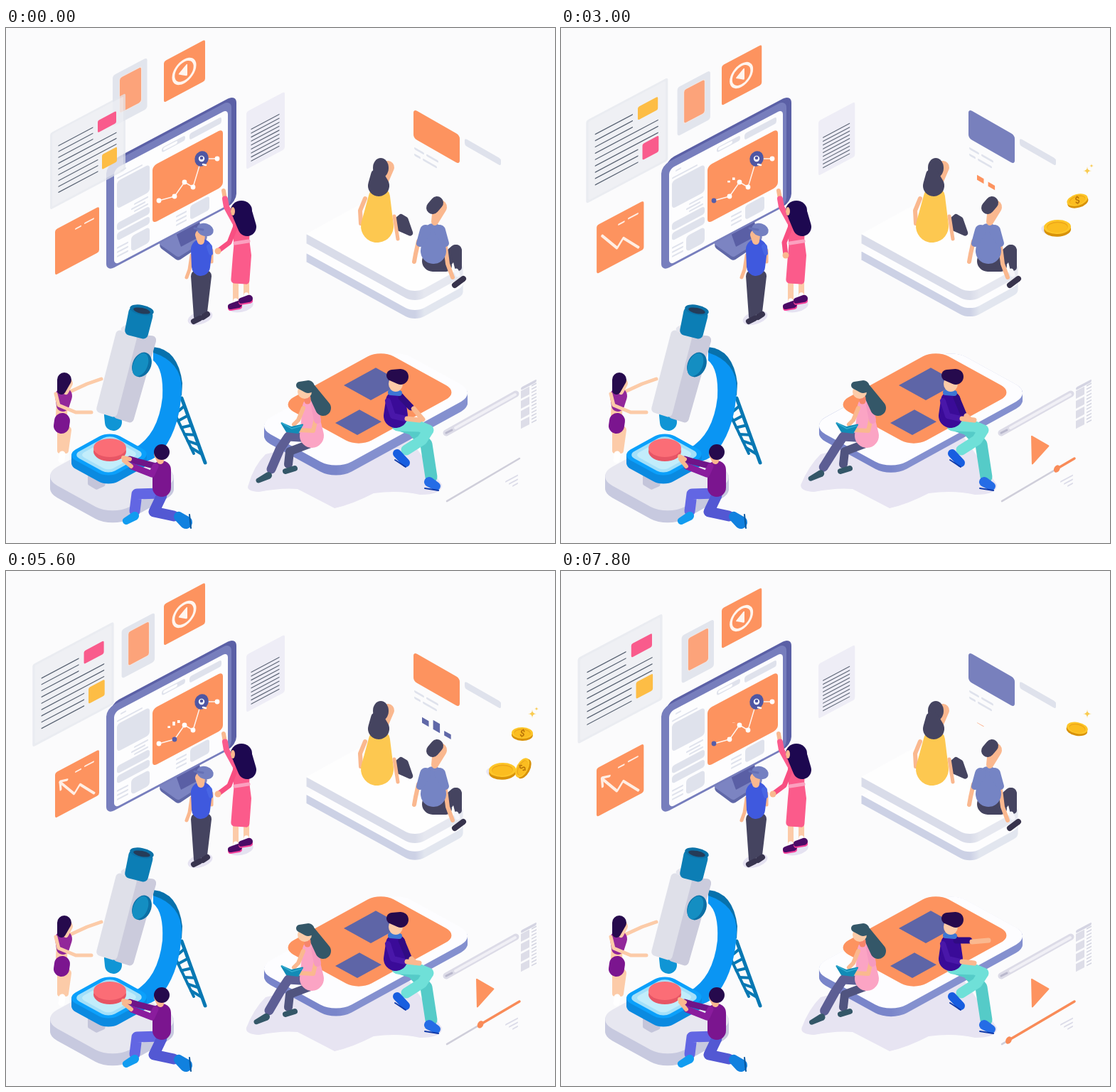
These frames come from a looping animation (772 px wide and 725 px high, 8000 ms). An HTML page with a canvas:

```html
<!DOCTYPE html>
<html lang="en">
<head>
<meta charset="utf-8">
<title>Isometric scenes</title>
<style>
html, body { margin: 0; width: 100%; height: 100%; overflow: hidden; background: #fbfbfc; }
canvas { display: block; }
</style>
</head>
<body>
<canvas id="stage" width="772" height="725"></canvas>
<script>
const ctx = document.getElementById('stage').getContext('2d');
const LOOP = 8000, STEP = 200;
const ORANGE = '#fd935f', PURPLE = '#6068a8', INK = '#454460', SKIN = '#fab88f', PALE = '#fccba8';
const PINK = '#f95b8c', YELLOW = '#fdbd45', GREY = '#dfe2ec', NIGHT = '#260a4d', WHITE = '#fff';
const TEAL = '#345768', NAVY = '#3a0b98', PLUM = '#7b158f', BLUE = '#0a95f3', DEEP = '#0c7eb5';

const clamp = v => Math.max(0, Math.min(1, v));
const mix = (a, b, k) => a + (b - a) * k;
const ease = (t, from, to) => { const k = clamp((t - from) / (to - from)); return k * k * (3 - 2 * k); };

function poly(color, r, ...xy) {
  const n = xy.length / 2, at = i => [xy[(i % n) * 2], xy[(i % n) * 2 + 1]];
  ctx.beginPath();
  ctx.moveTo((xy[0] + at(n - 1)[0]) / 2, (xy[1] + at(n - 1)[1]) / 2);
  for (let i = 0; i < n; i++) ctx.arcTo(...at(i), ...at(i + 1), r);
  ctx.fillStyle = color;
  ctx.fill();
}

function line(color, w, ...xy) {
  ctx.beginPath();
  for (let i = 0; i < xy.length; i += 2) ctx.lineTo(xy[i], xy[i + 1]);
  ctx.strokeStyle = color;
  ctx.lineWidth = w;
  ctx.lineCap = ctx.lineJoin = 'round';
  ctx.stroke();
}

function oval(color, x, y, rx, ry = rx, rot = 0) {
  ctx.beginPath();
  ctx.ellipse(x, y, rx, ry, rot, 0, 7);
  ctx.fillStyle = color;
  ctx.fill();
}

// Hull of two circles: the building block of every figure
function limb(color, x0, y0, r0, x1, y1, r1 = r0) {
  const a = Math.atan2(y1 - y0, x1 - x0);
  const f = Math.acos((r0 - r1) / Math.hypot(x1 - x0, y1 - y0));
  ctx.beginPath();
  ctx.arc(x0, y0, r0, a + f, a - f + 2 * Math.PI);
  ctx.arc(x1, y1, r1, a - f, a + f);
  ctx.fillStyle = color;
  ctx.fill();
}

function shape(color, d) {
  ctx.fillStyle = color;
  ctx.fill(new Path2D(d));
}

function box(color, x, y, w, h, r = 0) {
  ctx.beginPath();
  ctx.roundRect(x, y, w, h, r);
  ctx.fillStyle = color;
  ctx.fill();
}

function within(matrix, draw) {
  ctx.save();
  ctx.transform(...matrix);
  draw();
  ctx.restore();
}

// Upright plane with sloping rows, and ground plane hung from its left corner
const plane = (x, y, s, draw, slope = -0.53) => within([s, s * slope, 0, s, x, y], draw);
const ground = (x, y, draw) => within([1, -0.55, 1, 0.55, x, y], draw);
const tile = (color, x, y, w, h, r = 0) => ground(x, y, () => box(color, 0, 0, w, h, r));

function slab(x, y, w, h, r, depth, top, dark, light) {
  const side = ctx.createLinearGradient(0, 0, (w + h) / 2, (w + h) / 2);
  side.addColorStop(h / (w + h), dark);
  side.addColorStop(Math.min(1, h / (w + h) + 0.06), light);
  for (let d = depth; d > 0; d--) tile(side, x, y + d, w, h, r);
  tile(top, x, y, w, h, r);
}

function shade(alpha, draw) {
  ctx.save();
  ctx.globalAlpha = alpha;
  draw();
  ctx.restore();
}

function article(k, a) {
  const top = a < 2900 ? PINK : YELLOW, low = a > 2900 && a < 4500 ? PINK : YELLOW;
  plane(mix(62, 15, k), mix(148, 117, k), mix(1, 1.15, k), () => {
    shade(0.72, () => box('#e3e6ee', 0, 0, 106, 108, 3));
    shade(0.35, () => box('#f6f7fa', 3, 3, 100, 102, 2));
    for (let i = 0; i < 9; i++) {
      const w = i < 3 ? 48 : i < 6 ? 81 : 55;
      line('#586272', 1.3, 12, 24 + i * 8.2, 12 + w, 24 + i * 8.2);
    }
    box(top, 67, 18, 26, 17, 2);
    box(low, 73, 69, 21, 21, 2);
  });
}

function picture(k) {
  plane(mix(150, 174, k), mix(67, 97, k), mix(1, 0.92, k), () => {
    box('#e2e5ed', 0, 0, 48.5, 72, 4);
    box('#f3e6e2', 9, 8, 32, 51, 3);
    box('#fca37a', 10, 9, 30, 49, 3);
  });
}

function playCard(k) {
  plane(mix(222, 226, k), mix(47, 53, k), mix(1, 0.97, k), () => {
    box(ORANGE, 0, 0, 58, 58, 3);
    oval('#fff5ee', 28.5, 29, 17);
    oval(ORANGE, 28.5, 29, 13.2);
    poly('#fff5ee', 1, 20, 29, 33, 20, 33, 38);
  });
}

function memo(k) {
  plane(mix(338, 362, k), mix(118, 131, k), mix(1, 0.95, k), () => {
    box('#eeedf6', 0, 0, 54, 81, 3);
    for (let i = 0; i < 9; i++) line('#5c6475', 1.3, 7, 28 + i * 5.6, 46, 28 + i * 5.6);
  });
}

function arrowCard(k, t) {
  const c = t % 2100, drawn = Math.sqrt(clamp(c / 1000));
  plane(mix(69, 50, k), mix(284, 278, k), mix(1, 1.07, k), () => {
    box(ORANGE, 0, 0, 62, 64, 3);
    line('#ffeee4', 2, 29, 14, 36, 14);
    line('#ffeee4', 2, 42, 13, 54, 13);
    if (!drawn) return;
    shade(1 - ease(c, 1600, 2050), () => {
      ctx.setLineDash([80 * drawn, 200]);
      line('#ffeee4', 3, 55, 58, 35, 35, 27, 44, 7, 17);
      ctx.setLineDash([]);
      if (drawn === 1) line('#ffeee4', 3, 17, 19, 7, 16, 8, 28);
    });
  });
}

// Calls draw(index, share of full height) for each growing bar
function bars(b, draw) {
  shade(1 - ease(b, 2250, 2480), () => {
    for (let i = 0; i < 5; i++) draw(i, clamp((b - 280 - 130 * i) / 250));
  });
}

function chart(b) {
  bars(b, (i, g) => {
    const h = (4 + 2.5 * i + 0.6 * i * i) * g;
    box(WHITE, 241 - 6.8 * i, 214 + 3.5 * i - h, 3.6, h);
  });
  const nodes = [[215, 243], [237, 237], [251, 217], [263, 224], [275, 184], [297, 184]];
  line('#fff3ec', 1.5, ...nodes.flat());
  const active = Math.floor((b - 250) / 340);
  nodes.forEach(([x, y], i) => oval(i === active ? '#565da8' : WHITE, x, y, 3.4));
  oval('#4f57a3', 275, 184, 9.5, 11, 0.4);
  oval(WHITE, 275, 184, 4.2);
  oval('#4f57a3', 275, 183, 2.3);
  line(WHITE, 2.5, 277, 192, 281, 193);
}

function monitor(b) {
  poly(PURPLE, 6, 211, 305, 255, 282, 288, 297, 242, 328);
  poly('#7c84c2', 5, 211, 301, 255, 278, 288, 294, 242, 323);
  poly('#5a5fa5', 1, 236, 280, 270, 262, 276, 292, 246, 308);
  plane(147, 187, 1, () => box('#5b60a6', 0, 0, 177, 152, 12));
  plane(141, 194, 1, () => box('#777ebd', 0, 0, 176, 149, 11));
  plane(152, 199, 1, () => {
    box('#fdfdfe', 0, 0, 160, 135, 7);
    box(GREY, 9, 6, 8, 2, 1);
    box(GREY, 67, 5, 33, 7, 3);
    box('#fdfdfe', 69, 6.5, 20, 4, 2);
    box(GREY, 106, 6, 45, 9, 3);
    box(GREY, 4, 14, 36, 2, 1);
    box(GREY, 4, 19, 46, 39, 5);
    for (let i = 0; i < 3; i++) {
      box(GREY, 28 - i % 2 * 4, 63 + i * 5, 20, 2.2, 1);
      box(GREY, 4, 112 + i * 6, 16, 2.2, 1);
      box(GREY, 87, 112 + i * 6, 15, 2.2, 1);
      if (i) box(GREY, 4, 64 + i * 14, 46, 11, 4);
    }
    box(GREY, 24, 107, 26, 22, 5);
    box(GREY, 107, 108, 27, 20, 4);
    box(ORANGE, 54, 24, 99, 81, 6);
  });
  chart(b);
}

function boy() {
  oval('#e5e2f1', 273, 408, 18, 9, -0.3);
  limb(INK, 268, 349, 8, 269, 406, 5);
  limb(INK, 281, 349, 8, 278, 400, 5);
  limb('#38344f', 264, 413, 4, 272, 409);
  limb('#38344f', 277, 407, 4, 283, 403);
  line(SKIN, 5, 261, 320, 258, 340, 254, 351);
  line(SKIN, 5, 289, 313, 289, 329);
  limb('#3f59de', 275, 312, 15, 274, 336, 13);
  limb('#4866e4', 286, 308, 4, 288, 317, 3);
  limb(SKIN, 273, 291, 7, 274, 300, 5);
  oval('#7480c1', 280, 284, 12, 9, 0.3);
  line('#6570b5', 3, 265, 282, 277, 284);
}

function presenter(t, b) {
  const press = ease(b, 580, 1200) - ease(b, 2200, 2500);
  const reach = 1 - ease(t, 600, 1300) + ease(t, 3600, 5600);
  oval('#e5e2f1', 330, 391, 18, 9, -0.2);
  for (const x of [323, 338]) {
    const y = 389 - (x - 323) * 0.55;
    line(PALE, 8, x, 350, x, y - 6);
    line(WHITE, 7, x, y - 5, x, y);
    limb('#f33f99', x - 7, y + 5, 4, x + 5, y + 3);
    limb('#4b0b66', x - 7, y + 3, 4, x + 4, y, 5);
  }
  const hx = mix(306, 295, press), hy = mix(229, 241, press);
  const ex = mix(310, 307, press), ey = mix(252, 257, press);
  line(SKIN, 6, hx, hy, ex, ey);
  line('#fb5b8d', 8, (hx + ex) / 2, (hy + ey) / 2, ex, ey, 322, 274);
  limb('#fb5b8b', 331, 277, 12, 331, 302, 11);
  poly('#fb5b8b', 5, 321, 299, 342, 297, 345, 320, 342, 361, 316, 359, 319, 320);
  line('#fba0bf', 5, 322, 303, 341, 300);
  const gx = mix(316, 298, reach), gy = mix(320, 314, reach);
  line('#f84f82', 7, 323, 279, 314, 302, gx, gy);
  oval(SKIN, gx, gy, 4.5);
  oval('#1d0850', 331, 257, 15, 14);
  limb('#1d0850', 333, 263, 14, 339, 280, 13);
  oval(SKIN, 319, 258, 3, 6);
}

function coin(x, y, rx = 19, ry = 10, rot = 0, mark = '') {
  within([Math.cos(rot), Math.sin(rot), -Math.sin(rot), Math.cos(rot), x, y], () => {
    oval('#d89209', 0, rx / 5, rx, ry);
    oval('#fdc629', 0, 0, rx, ry);
    oval('#eea819', 0, 0, rx * 0.78, ry * 0.75);
    oval('#fbbd20', 0, 1, rx * 0.74, ry * 0.68);
    ctx.fillStyle = '#b97408';
    ctx.font = 'italic bold 13px Roboto, sans-serif';
    ctx.textAlign = 'center';
    ctx.textBaseline = 'middle';
    ctx.fillText(mark, 0, 1);
  });
}

function star(x, y, r) {
  shape('#f9cb51', `M${x} ${y - r}Q${x} ${y} ${x + r} ${y}Q${x} ${y} ${x} ${y + r}Q${x} ${y} ${x - r} ${y}Q${x} ${y} ${x} ${y - r}Z`);
}

function coins(b) {
  shade(1 - ease(b, 2250, 2480), () => {
    if (b >= 500) oval('#e9e6f2', 692, 285, 17, 8, 0.2);
    for (let i = 0; i < 6; i++) {
      const pile = Math.floor(i / 3), n = i % 3;
      const left = 500 + 990 * pile + 140 * n - b;
      const mark = n === 2 ? `${20 + 20 * pile}%` : '';
      if (left <= 0) coin(698 + 28 * pile, 280 + 18 * pile - n * 5, 19, 10, -0.04, mark);
      else if (left < 235) coin(726, 291 - 0.35 * left, 15, 8, 0.2 - (200 - left) * 0.008, i ? '$' : '');
    }
  });
  if (b > 250 && b < 700) {
    star(740, 201, 6);
    if (b > 400) star(746, 194, 3);
  }
}

function board(late, b) {
  plane(573, 114, 1, () => {
    box(late ? '#7880bd' : ORANGE, 0, 0, 65, 41, 5);
    for (let i = 0; i < 2; i++) {
      box(GREY, 1, 53 + 9 * i, 14 - 5 * i, 3, 1.5);
      box(GREY, 18 - 5 * i, 53 + 9 * i, 17 + 3 * i, 3, 1.5);
    }
    box(GREY, 72, 0, 51, 10, 3);
    bars(b, (i, g) => {
      const h = (8 + 8 * i + i * i) * g;
      box(late ? ORANGE : PURPLE, 12 + 15.6 * i, 93 - h, 9.5, h);
    });
  }, 0.57);
}

function bench(bob) {
  const corners = [0, 0, 13, 13];
  slab(422, 314 + 3 * bob, 75, 153, corners, 12, '#fdfdfe', '#ccd1e5', '#e2e6ef');
  slab(422, 290, 75, 153, corners, 13, '#fefefe', '#d9dce9', '#e6e8f0');
}

function sitters() {
  line(SKIN, 6, 505, 240, 498, 257, 499, 275);
  poly(INK, 4, 547, 268, 555, 261, 565, 267, 575, 296, 550, 285);
  line(SKIN, 5, 546, 265, 551, 297);
  limb('#fdc850', 525, 238, 15, 522, 279, 23);
  limb(SKIN, 537, 196, 9, 531, 220, 5);
  oval(INK, 527, 197, 11, 14);
  limb(INK, 522, 207, 9, 524, 222, 15);

  limb(INK, 600, 328, 15, 619, 335, 8);
  limb(INK, 618, 328, 10, 632, 313, 8);
  limb(INK, 633, 313, 8, 636, 337, 5);
  line('#f5f5fa', 7, 633, 342, 635, 347);
  limb('#37334c', 631, 362, 4, 643, 353);
  line(SKIN, 6, 580, 300, 576, 318, 574, 329);
  line(SKIN, 6, 618, 308, 621, 332, 628, 351);
  limb('#7584c4', 601, 290, 15, 601, 314, 18);
  for (const side of [-1, 1]) limb('#7584c4', 600 + side * 10, 285, 8, 600 + side * 18, 303, 5);
  limb(SKIN, 610, 252, 10, 603, 273, 5);
  limb(INK, 606, 246, 9, 600, 253, 9);
}

function ladder() {
  const left = k => [mix(234, 264, k), mix(536, 599, k)];
  const right = k => [mix(247, 280, k), mix(521, 612, k)];
  line('#0878b3', 4, ...left(0), ...left(1));
  line('#0878b3', 5, ...right(0), ...right(1));
  for (let k = 0.12; k < 1; k += 0.15) line('#0878b3', 4, ...left(k), ...right(k));
}

function microscope() {
  slab(48, 631, 100, 102, 24, 17, '#e7e7f0', '#c7c9df', '#c7c9df');
  ladder();
  shape('#0871ac', 'M207 449 Q242 452 248 500 L247 518 L207 465Z');
  shape(BLUE, 'M207 457 Q247 470 247 508 Q245 560 222 592 Q212 606 198 610 L180 592 Q214 573 220 520 Q222 480 207 468Z');
  poly('#c4c5da', 3, 115, 626, 142, 630, 139, 645, 127, 650, 115, 643);
  slab(84, 601, 62, 60, 14, 12, '#0ba0fb', '#0b8ae0', '#0b8ae0');
  tile('#a4e0f9', 94, 601, 52, 50, 9);
  tile('#c2edfb', 103, 601, 43, 41, 7);
  limb('#e75565', 145, 599, 9, 147, 599);
  oval('#e75565', 146, 596, 23, 14);
  oval('#fb6d76', 146, 591, 23, 13);
  limb('#1095d5', 150, 545, 12, 151, 555, 12);
  poly('#cbcbdc', 6, 180, 431, 213, 434, 178, 557, 150, 548);
  poly('#dfe0e9', 6, 156, 424, 185, 433, 155, 549, 126, 540);
  poly('#e6e6ee', 4, 156, 425, 172, 416, 214, 434, 184, 435);
  poly(DEEP, 7, 174, 391, 208, 400, 198, 439, 166, 431);
  oval('#0c72a8', 191, 397, 17, 7, 0.2);
  oval('#253c59', 191, 398, 12, 4, 0.2);
  oval('#0b6fa5', 191, 474, 13, 18, 0.4);
  oval('#148ec2', 189, 474, 10, 17, 0.4);
}

function labWoman() {
  for (const x of [78, 86]) limb(PALE, x, 566, 6, x - 2, 595, 4);
  line(WHITE, 9, 79, 600, 78, 608);
  line(PALE, 5, 90, 512, 114, 501, 134, 494);
  limb(PALE, 79, 523, 8, 78, 545, 8);
  limb(PLUM, 79, 553, 11, 78, 560, 11);
  limb('#92279a', 81, 518, 12, 80, 531, 9);
  line(PALE, 5, 70, 515, 74, 531, 98, 541, 120, 541);
  limb(PALE, 87, 500, 7, 84, 512, 4);
  limb(NIGHT, 82, 495, 10, 78, 510, 6);
}

function labMan(lift) {
  line('#6266e3', 15, 217, 655, 184, 656, 181, 680);
  line('#5358d3', 15, 219, 658, 208, 681, 236, 687);
  limb('#119cf0', 181, 687, 6, 169, 694, 5);
  limb('#1181df', 243, 688, 7, 253, 696, 9);
  line('#07569d', 2, 258, 685, 260, 704);
  line('#6f1488', 9, 211, 617, 184, 610, 174, 607);
  line(SKIN, 6, 174, 607, 165 + lift, 605 - lift);
  limb(PLUM, 219, 622, 13, 219, 647, 13);
  line('#8a1c9d', 9, 210, 617, 205, 628, 177, 617);
  line(SKIN, 6, 176, 617, 166 + lift, 609 - lift);
  limb(SKIN, 214, 600, 6, 217, 609, 5);
  oval(NIGHT, 219, 597, 11, 11);
}

function phone(bob) {
  const x = 337 + 4 * bob;
  shape('#e7e4f2', `M365 600 Q348 617 ${x} 643 Q336 652 356 653 Q387 647 410 649 Q441 665 462 676 Q486 671 517 655 Q552 650 582 657 Q614 657 613 643 L552 555Z`);
  slab(350, 560, 198, 114, 22, 10 + 4 * bob, '#fdfdff', '#7985ca', '#8490cf');
  tile(ORANGE, 386, 530, 141, 110, 18);
  tile('#5e65a7', 475, 503, 45, 38);
  tile('#5e65a7', 463, 556, 34, 31);
}

function reader(bob) {
  const x = 4 * bob, y = 3 * bob;
  line('#50547f', 12, 431, 584, 399, 596, 397, 614);
  line('#5d5e94', 13, 430, 577, 397, 575, 385, 593, 369 + x, 618 + y);
  limb(TEAL, 351 + x, 634 + y, 3.5, 365 + x, 627 + y, 5);
  limb(TEAL, 393, 624, 4, 406, 620);
  limb('#fba4c4', 427, 532, 10, 430, 574, 17);
  line(SKIN, 6, 418, 535, 411, 552, 405, 558);
  line(SKIN, 6, 436, 550, 432, 567, 414, 566);
  limb('#f59ac0', 434, 531, 5, 438, 552, 5);
  poly('#128bb6', 1, 385, 554, 401, 561, 419, 557, 411, 571, 394, 569);
  line('#31acd0', 1.5, 388, 556, 402, 564, 416, 560);
  limb(TEAL, 429, 508, 7, 446, 535, 11);
  line('#f6856a', 9, 424, 521, 424, 525);
  oval(PALE, 420, 512, 10, 10);
  limb(TEAL, 413, 503, 5, 425, 505, 9);
}

function swiper(t) {
  const out = 0.42 * (1 - ease(t, 200, 800)) + ease(t, 3800, 4500) - ease(t, 4800, 5400) + ease(t, 7000, 7700);
  line('#55cbc8', 17, 550, 558, 572, 565, 591, 586, 598, 632);
  line('#6fe0d8', 15, 551, 560, 582, 561, 594, 566, 585, 580, 563, 594);
  limb('#175ee0', 550, 599, 6, 562, 612, 6);
  limb('#256ce6', 595, 639, 7, 605, 645, 6);
  line('#103aa8', 2, 589, 648, 608, 651);
  line('#103aa8', 2, 547, 608, 562, 618);
  limb(NAVY, 548, 525, 14, 548, 546, 17);
  const hx = mix(575, 601, out), hy = mix(551, 520, ease(out, 0.4, 1));
  const ex = mix(566, 574, out), ey = mix(544, 520, out);
  line('#300b83', 9, 556, 520, ex, ey);
  line(SKIN, 7, ex + 4, ey + 2, hx, hy);
  line('#4917a9', 8, 537, 525, 544, 546, 561, 550);
  line(SKIN, 7, 564, 550, 581, 552);
  line('#3d76d4', 8, 541, 513, 553, 514);
  oval(PALE, 548, 501, 10, 11);
  limb(NIGHT, 543, 489, 8, 555, 491, 11);
}

function player(t) {
  line('#dcdbe7', 9, 619, 570, 717, 515);
  line('#b9b8cc', 3, 619, 570, 627, 566);
  line('#f1f0f6', 4, 632, 563, 716, 516);
  plane(724, 511, 1, () => {
    box('#d4d4e2', 0, -5, 22, 4, 2);
    for (let i = 0; i < 12; i++) {
      if (i % 3 === 0) box('#dddde8', 0, i * 4.7, 12, 11);
      box('#d2d3e0', 15, i * 4.7, 7, 1.6);
    }
  });
  const track = x => [x, 606 + (722 - x) * 0.59];
  line('#cfceda', 2.5, ...track(620), ...track(722));
  for (let i = 0; i < 3; i++) plane(702 + i * 5, 638 + i * 3, 1, () => box('#dbdbe8', 0, 0, 18 - i * 5, 2, 1));
  shade(ease(t, 300, 900), () => {
    poly(ORANGE, 1, 661, 573, 687, 588, 662, 616);
    const s = t / 1000, knob = track(722 - 7.6 * s - 0.07 * s ** 3);
    line('#f98b58', 3.5, ...knob, ...track(722));
    oval('#f98b58', ...knob, 4, 5.5, 0.5);
  });
}

function draw(t) {
  const a = t % 5000, b = t % 2500;
  const bob = 0.5 + 0.5 * Math.cos(t / 2100 * 2 * Math.PI);
  const slide = ease(a, 0, 1160) - ease(a, 2500, 3600);
  ctx.fillStyle = '#fbfbfc';
  ctx.fillRect(0, 0, 772, 725);

  picture(slide);
  playCard(ease(a, 1500, 2500) - ease(a, 3900, 4600));
  memo(ease(a, 900, 2150) - ease(a, 3400, 4500));
  arrowCard(ease(a, 600, 1650) - ease(a, 2950, 4000), t);
  monitor(b);
  article(slide, a);
  presenter(t, b);
  boy();

  bench(bob);
  board(a >= 2500, b);
  sitters();
  coins(b);

  microscope();
  labWoman();
  labMan(2 * (ease(t, 1400, 2400) - ease(t, 4700, 5500) + ease(t, 6600, 7600)));

  phone(bob);
  reader(bob);
  swiper(t);
  player(t);
}

const start = performance.now();
function tick() {
  const t = Math.floor((performance.now() - start) % LOOP / STEP) * STEP;
  draw(t < 400 ? 0 : t);
  requestAnimationFrame(tick);
}
tick();
</script>
</body>
</html>
```
